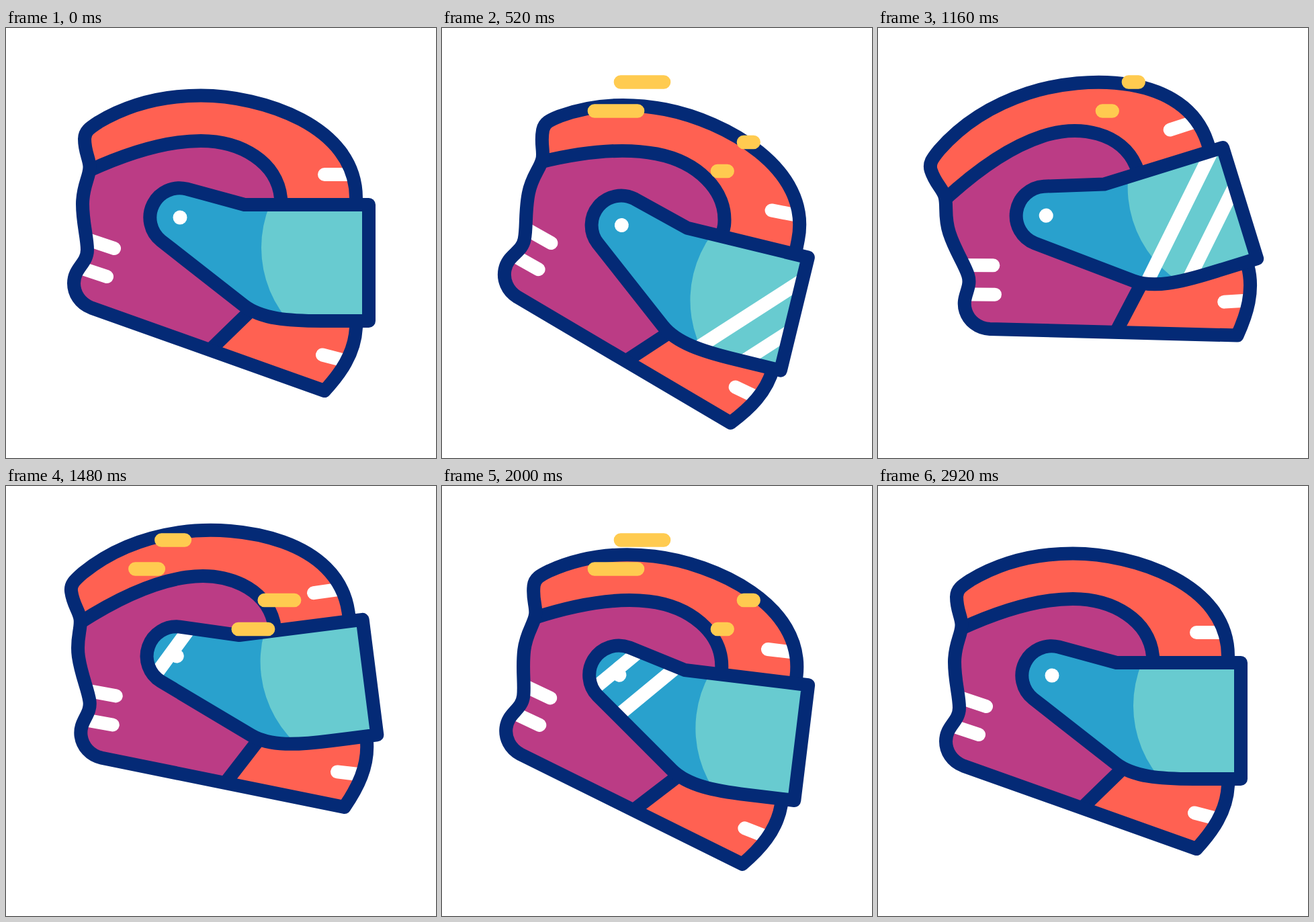
These frames come from a looping animation (640 by 640 pixels, 3000 ms). An HTML page:

```html
<!DOCTYPE html>
<html lang="en">
<head>
<meta charset="utf-8">
<title>Racing helmet</title>
<style>
  html, body { margin: 0; width: 100%; height: 100%; overflow: hidden; background: #fff; }
  svg { display: block; width: 100%; height: 100%; }
  .outline { fill: none; stroke: #042a76; stroke-width: 20; stroke-linejoin: round; }
  .shine { fill: none; stroke: #fff; stroke-width: 20; stroke-linecap: round; }
  #wind { fill: none; stroke: #ffcb50; stroke-width: 20.5; stroke-linecap: round; }
</style>
</head>
<body>
<svg viewBox="0 0 640 640">
  <defs>
    <path id="shell" d="M474 540L127 416.500C110 410 101 395 101 380C101 357 121 351 121 330C121 312 114 290 114 262C114 235 124.500 222 124.500 207C124.500 195 117 185 117 165C117 154 124 149 138 140C185 112 238 100.500 290 100.500C380 100.500 521 145 521 253V446C519 485 497 515 474 540Z"/>
    <path id="glass" d="M540 263V436H470C420 436 380 433 354 413L230.700 316.500A44 44 0 0 1 268.700 239.500L355 263Z"/>
    <clipPath id="shellClip"><use href="#shell"/></clipPath>
    <clipPath id="glassClip"><use href="#glass"/></clipPath>
  </defs>
  <g id="helmet">
    <use href="#shell" fill="#ff6152"/>
    <g clip-path="url(#shellClip)">
      <path fill="#bb3c85" d="M122 213C172 190 235 168 290 168C350 168 404 200 409 253L375 410L304 479L300 560H50V213Z"/>
      <path class="shine" d="M105 309.300L161 328M95 351.700L150 370M474 218H525M471 486.500L515 498"/>
    </g>
    <path class="outline" d="M122 213C172 190 235 168 290 168C350 168 404 200 409 253V280M304 479L375 410"/>
    <use href="#shell" class="outline"/>
    <g id="visor">
      <use href="#glass" fill="#29a1cd"/>
      <g clip-path="url(#glassClip)">
        <circle cx="547" cy="327" r="167" fill="#68cbd0"/>
        <path id="glare" fill="#fff"/>
      </g>
      <circle cx="259" cy="282" r="10.500" fill="#fff"/>
      <use href="#glass" class="outline"/>
    </g>
  </g>
  <path id="wind"/>
</svg>
<script>
const LOOP = 3000, STEP = 40;
const byId = id => document.getElementById(id);
const helmet = byId('helmet'), visor = byId('visor'), glare = byId('glare'), wind = byId('wind');

// Swings between [time, value] turning points, easing in and out of each.
const swing = (...turns) => t => turns.slice(1).reduce((value, [time, next], i) => {
  const [since, prev] = turns[i];
  const u = Math.min(1, Math.max(0, (t - since) / (time - since)));
  return value + (next - prev) * u * u * (3 - 2 * u);
}, turns[0][1]);

const lift = swing([0, 0], [680, 26], [1390, -40], [2160, 12], [2920, 0]);
const tilt = swing([0, 0], [560, 11.1], [1210, -18.6], [1840, 8], [2480, 0]);
const visorTilt = swing([0, 0], [600, 14.4], [1240, -18.6], [1790, 9.5], [2440, -1], [2800, 0]);

// A gust is a pair of parallel dashes, followed by a second pair lower down.
const GUSTS = [260, 1100, 1740], GUST_TIME = 520;

function dash(age, x, y) {
  const u = age / GUST_TIME;
  if (u <= 0 || u >= 1) return '';
  const head = Math.min(1.3 * u, 0.3 + 0.7 * u);
  const tail = Math.max(0.7 * u, 1.3 * u - 0.3);
  return `M${x - 214 * head} ${y}H${x - 214 * tail}`;
}

function windPath(t) {
  let d = '';
  for (const start of GUSTS) {
    for (const pair of [0, 1]) {
      const age = t - start - 200 * pair;
      const x = 405 + 76 * pair, y = 80.5 + 89.5 * pair;
      d += dash(age, x, y) + dash(age, x - 39, y + 43);
    }
  }
  return d;
}

// Two slanted bands cross the glass three times at a steady speed.
function glarePath(t) {
  const age = t - 400;
  if (age < 0 || age >= 3 * 592) return '';
  const x = 666 - 1.04 * (age % 592);
  const band = left => `M${left + 95} 182h28L${left - 162} 482h-28Z`;
  return band(x) + band(x + 74);
}

function draw(t) {
  const angle = tilt(t);
  helmet.setAttribute('transform', `translate(0 ${lift(t)}) rotate(${angle} 320 320)`);
  visor.setAttribute('transform', `rotate(${visorTilt(t) - angle} 259 282)`);
  glare.setAttribute('d', glarePath(t));
  wind.setAttribute('d', windPath(t));
}

function tick() {
  const t = performance.now() % LOOP;
  draw(Math.floor(t / STEP) * STEP);
  requestAnimationFrame(tick);
}
tick();
</script>
</body>
</html>
```
